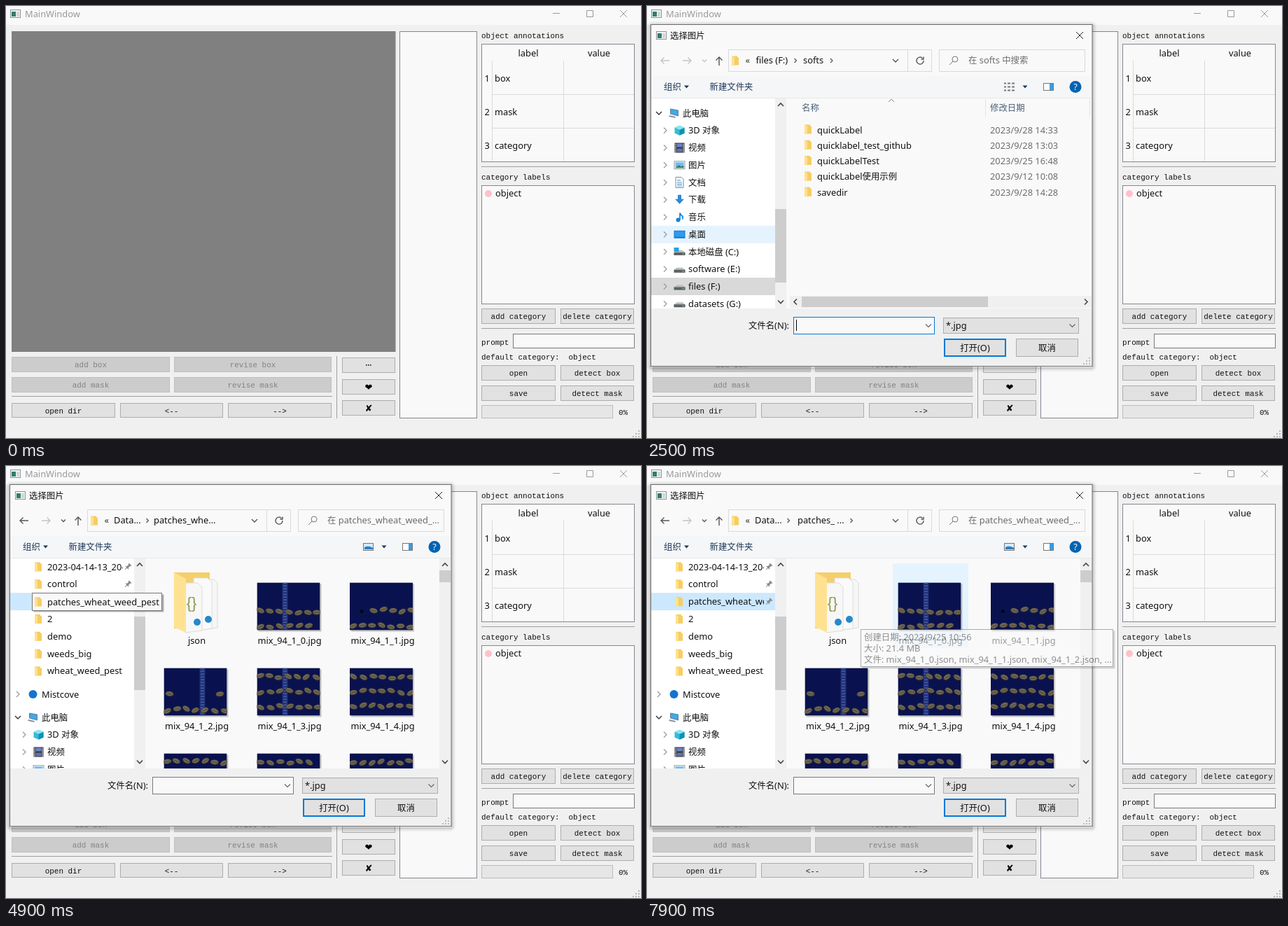
Recreate the animation shown at these times as an HTML page. Size 907 by 617 pixels, loop 8000 ms.

```html
<!DOCTYPE html>
<html lang="zh-CN">
<head>
<meta charset="utf-8">
<title>MainWindow</title>
<style>
html, body { margin: 0; width: 100%; height: 100%; overflow: hidden; background: #f0f0f0; }
svg { display: block; }
text { font: 12.85px "Noto Sans", "Noto Sans CJK SC", "Noto Sans CJK", sans-serif; white-space: pre; }
.cjk { font-size: 12.4px; font-family: "Noto Sans CJK SC", "Noto Sans CJK", sans-serif; }
.mono { font: 10.95px "Liberation Mono", monospace; }
.sym { font: 13px "DejaVu Sans", sans-serif; }
</style>
</head>
<body>
<svg id="stage" width="100%" height="100%" viewBox="0 0 907 617"></svg>
<script>
const WHITE = '#f9f9f9', BLUE = '#0078d7', FRAME = '#828790', INK = '#111', BLUEISH = '#1e395b';

let seed = 7;
const rnd = () => (seed = seed * 16807 % 2147483647) / 2147483647;

const rect = (x, y, w, h, fill, stroke, extra = '') =>
  `<rect x="${x}" y="${y}" width="${w}" height="${h}" fill="${fill}"${stroke ? ` stroke="${stroke}"` : ''} ${extra}/>`;
const path = (d, stroke, fill = 'none', w = 1) =>
  `<path d="${d}" fill="${fill}" stroke="${stroke}" stroke-width="${w}"/>`;
const dot = (x, y, r, fill) => `<circle cx="${x}" cy="${y}" r="${r}" fill="${fill}"/>`;
const group = (id, body, extra = '') => `<g id="${id}" ${extra}>${body}</g>`;

// y is the middle of the line; Chinese runs are set slightly smaller
const runs = s => s.replace(/[\u4e00-\u9fff]+/g, m => `<tspan class="cjk">${m}</tspan>`);
const text = (x, y, s, fill = INK, extra = '') =>
  `<text x="${x}" y="${y + 4.5}" fill="${fill}" ${extra}>${runs(s)}</text>`;
const MID = 'text-anchor="middle"';
const mono = (x, y, s, fill = INK, extra = '') =>
  `<text class="mono" x="${x}" y="${y + 3.5}" fill="${fill}" ${extra}>${s.replace(/</g, '&lt;')}</text>`;

const chevron = (x, y, turn = 0, size = 4, stroke = '#555', w = 1.2) =>
  `<path transform="translate(${x} ${y}) rotate(${turn})" d="M${-size} ${-size / 2}L0 ${size / 2}L${size} ${-size / 2}" fill="none" stroke="${stroke}" stroke-width="${w}"/>`;
const caretDown = (x, y) => path(`M${x - 3.5} ${y - 1.5}h7l-3.5 4z`, 'none', BLUEISH);
const cross = (x, y, r, stroke) => path(`M${x - r} ${y - r}l${2 * r} ${2 * r}M${x + r} ${y - r}l${-2 * r} ${2 * r}`, stroke);
const appIcon = (x, y) => rect(x + .5, y + .5, 14, 11, '#f4f6f6', '#8b9296') + rect(x + 2, y + 3, 6, 7, '#2f7d6b') + rect(x + 9, y + 3, 4, 7, '#cfd6d8');
const folder = (x, y) => path(`M${x - 5} ${y - 6.5}h8v2h2v11h-10z`, 'none', '#f5cd62') + path(`M${x - 5} ${y - 6.5}l4 2v12l-4 -2z`, 'none', '#ffe08c');
const grip = (x, y, c) => [[0, 0], [-4, 0], [-8, 0], [0, -4], [-4, -4], [0, -8]].map(p => rect(x + p[0], y + p[1], 2, 2, c)).join('');
const rule = (x1, y1, x2, y2, c = '#a0a0a0') => path(`M${x1} ${y1}L${x2} ${y2}`, c);

const button = (x, y, w, h, label, id) =>
  `<g${id ? ` id="${id}"` : ''}>` + rect(x + .5, y + .5, w - 1, h - 1, '#e1e1e1', '#adadad') + mono(x + w / 2, y + h / 2 + .5, label, INK, MID) + '</g>';
const disabled = (x, y, w, h, label) =>
  rect(x + .5, y + .5, w - 1, h - 1, '#ccc', '#bfbfbf') + mono(x + w / 2, y + h / 2 + .5, label, '#838383', MID);

function mainWindow() {
  let s = rect(0, 0, 907, 617, '#f0f0f0') + rect(0, 0, 907, 27, WHITE) + appIcon(6, 5);
  s += group('caption', text(27, 11, 'MainWindow', 'currentColor') + path('M781 10.5h10M829.5 6.5h9v9h-9z', 'currentColor') + cross(882, 11, 5, 'currentColor'));
  s += rect(8, 36, 548.5, 458, '#808080') + rect(562.5, 36.5, 110, 552, WHITE, FRAME);

  s += mono(679, 42.5, 'object annotations') + rect(679.5, 54.5, 218, 168, WHITE, FRAME);
  s += text(746, 67, 'label', INK, MID) + text(847, 67, 'value', INK, MID);
  s += path('M694.5 78V222M796.5 78V222M695 126.5H897M695 174.5H897', '#dadada');
  ['box', 'mask', 'category'].forEach((w, i) => {
    s += text(683.5, 103 + 48 * i, `${i + 1}`) + text(698, 103 + 48 * i, w);
  });
  s += rule(679, 229.5, 898, 229.5) + mono(679, 244.5, 'category labels');
  s += rect(679.5, 256.5, 218, 169, WHITE, FRAME) + dot(689, 268, 5, '#ffc0cb') + text(699, 267.5, 'object');
  s += button(679, 432, 106, 22, 'add category') + button(792, 432, 105, 22, 'delete category');
  s += rule(679, 460.5, 898, 460.5) + mono(679, 480, 'prompt') + rect(724.5, 468.5, 173, 20, WHITE, '#7a7a7a');
  s += mono(679, 501, 'default category:') + mono(803.5, 501, 'object');
  s += button(679, 513, 106, 22, 'open') + button(792, 513, 105, 22, 'detect box');
  s += button(679, 542, 106, 22, 'save') + button(792, 542, 105, 22, 'detect mask');
  s += rect(679.5, 570.5, 187, 18, '#e6e6e6', '#bcbcbc') + mono(875, 580, '0%') + grip(903, 614, '#b4b4b4');

  s += disabled(8, 501, 226, 22, 'add box') + disabled(240, 501, 225, 22, 'revise box');
  s += disabled(8, 530, 226, 22, 'add mask') + disabled(240, 530, 225, 22, 'revise mask');
  s += rule(8, 557.5, 466, 557.5) + rule(472.5, 500, 472.5, 589);
  s += button(8, 567, 148, 21, 'open dir', 'openDir') + button(163, 567, 147, 21, '<--') + button(317, 567, 148, 21, '-->');
  s += [502, 533, 563].map(y => button(480, y, 76, 22, '')).join('');
  s += [514, 517, 520].map(x => rect(x, 512, 1.6, 1.6, INK)).join('');
  return s + `<text class="sym" x="518" y="549" ${MID}>❤&#xfe0e;</text><text class="sym" x="518" y="579" ${MID}>✘</text>`;
}

// Tree icons, about 16 px wide, centred on (0, 0)
const disk = path('M-8 1l4 -3h8l4 3v4h-16z', 'none', '#b9bdc0') + rect(-8, 1, 16, 4, '#5c6165') + rect(4, 2.5, 2, 1, '#8fe08f');
const icons = {
  pc: path('M-5 -6l11 2v8l-11 -3z', '#5f7f95', '#43a8e8') + path('M-7 4l9 2', '#8494a0', 'none', 2),
  cube: path('M-7 -4l7 -3l7 3v8l-7 3l-7 -3z', 'none', '#35bcd6') + path('M0 -1l7 -3v8l-7 3z', 'none', '#1490b0') + path('M-7 -4l7 -3l7 3l-7 3z', 'none', '#8ce4f0'),
  video: rect(-7, -7, 14, 14, '#333') + rect(-4, -6, 8, 5, '#6b83c9') + rect(-4, 1, 8, 5, '#5a74b8') + path('M-5.5 -6v13M5.5 -6v13', '#ddd') + path('M-6 -3h1M-6 2h1', '#333'),
  image: rect(-7.5, -5.5, 15, 11, '#fff', '#8c979e') + rect(-6, -4, 12, 8, '#6fbcf0') + path('M-6 4l5 -4l3 2l4 -1v3z', 'none', '#3d7c5c'),
  doc: path('M-5.5 -7.5h8l3 3v12h-11z', '#7d8a94', '#fff') + path('M-3.5 -3h5M-3.5 0h7M-3.5 2.5h7M-3.5 5h7', '#3c8fd0'),
  down: path('M-2.5 -7h5v6h4l-6.5 7l-6.5 -7h4z', 'none', '#3287d6'),
  music: dot(-2, 4, 3, '#0f84d8') + path('M.5 4v-10q1 3 4 5v4', '#0f84d8', 'none', 1.7),
  desk: rect(-8, -5.5, 16, 11, '#1277c9') + rect(-7, -4.5, 14, 8, '#2d9bee'),
  disk, sysdisk: disk + rect(-8, -6, 7, 6, '#1fa5e8'),
  sky: dot(0, 0, 6, '#1373cf')
};
const STEP = 24.75;
const tree = [
  ...['2023-04-14-13_20-08', 'control', 'patches_wheat_weed_pest', '2', 'demo', 'weeds_big', 'wheat_weed_pest']
    .map((name, i) => ({ name, y: -62 + i * 24.83, pin: i < 3 })),
  { name: 'Mistcove', y: 120, icon: 'sky', top: true },
  ...['此电脑:pc', '3D 对象:cube', '视频:video', '图片:image', '文档:doc', '下载:down', '音乐:music', '桌面:desk',
    '本地磁盘 (C:):sysdisk', 'software (E:):disk', 'files (F:):disk', 'datasets (G:):disk'].map((s, i) => {
    const cut = s.lastIndexOf(':');
    return { name: s.slice(0, cut), icon: s.slice(cut + 1), y: 153 + i * STEP, top: i === 0 };
  })
];
const patchRow = tree[2], filesRow = tree[18];

function treeRows() {
  let rows = '', arrows = '';
  for (const r of tree) {
    const x = r.top ? 51 : 59;
    rows += text(x, r.y, r.name, INK, r.pin ? 'clip-path="url(#cut)"' : '');
    if (!r.icon) rows += folder(46, r.y);
    else {
      rows += `<g transform="translate(${x - 12.5} ${r.y})">${icons[r.icon]}</g>`;
      arrows += r.icon === 'pc' ? chevron(17, r.y, 0, 4, '#333', 1.4) : chevron(r.top ? 17 : 26, r.y, -90, 4, '#999');
    }
    if (r.pin) rows += `<g transform="translate(174 ${r.y}) rotate(45)">${path('M-2.5 -5h5v1.5l-1 .5v3l2 2h-7l2 -2v-3l-1 -.5zM-.5 1h1v4.5h-1z', 'none', '#858c92')}</g>`;
  }
  return rect(6, filesRow.y - 12.5, 177, 25, '#d9d9d9') + rect(6, -13, 177, 25, '#e5f3ff', '', 'id="hover"') + rows + group('arrows', arrows);
}

function shade() {
  let s = '';
  for (let i = 1; i < 8; i++)
    s += rect(6.5 - i, 28.5 - i, 629 + 2 * i, 487 + 2 * i, 'none', '#000', `rx="${i}" stroke-opacity="${.26 * (1 - i / 8) ** 1.6}"`);
  return s;
}

const listRows = [['quickLabel', '28 14:33'], ['quicklabel_test_github', '28 13:03'], ['quickLabelTest', '25 16:48'],
  ['quickLabel使用示例', '12 10:08'], ['savedir', '28 14:28']];

function listView() {
  let s = text(221, 145.5, '名称', '#4c607a') + text(490, 145.5, '修改日期', '#4c607a') + chevron(349, 135, 180, 4, '#888', 1);
  s += path('M483.5 133V158M632.5 133V158', '#e4e4e4');
  listRows.forEach(([name, day], i) => {
    const y = 177 + i * 22.3;
    s += folder(230, y - 1) + text(243, y, name) + text(490, y, '2023/9/' + day, '#6d6d6d');
  });
  s += rect(204, 414, 431, 17, '#f0f0f0') + rect(221, 415, 266, 15, '#cdcdcd');
  return s + chevron(212, 422.5, 90, 4, '#444', 1.6) + chevron(627, 422.5, -90, 4, '#444', 1.6);
}

const grain = (x, y, turn) =>
  `<g transform="translate(${x.toFixed(1)} ${y.toFixed(1)}) rotate(${turn.toFixed(0)})">` +
  '<ellipse rx="6.2" ry="3.9" fill="#2e2d30"/><ellipse rx="5.4" ry="3.1" cy="-.3" fill="#6f6653"/><path d="M-4 0h8" stroke="#4a4335" stroke-width=".9"/></g>';

// rows: [y, from, to] lines of grains inside the thumbnail
function thumb(x, y, rows, strip, spot) {
  let s = rect(0, 0, 90, 68, '#080f4a') + rect(0, 0, 90, 68, 'url(#weave)');
  if (strip) s += rect(strip - 4, 0, 8, 68, '#2c4190', '', 'opacity=".7"') +
    `<path d="M${strip} 0V68" stroke="#7184bd" stroke-width="5" stroke-dasharray="1.5 2.5" opacity=".5"/>`;
  if (spot) s += dot(spot[0], spot[1], 2.5, '#05060f');
  for (const [ry, from, to] of rows)
    for (let gx = from; gx <= to; gx += 12.5 + rnd() * 2) s += grain(gx, ry + rnd() * 4 - 2, rnd() * 70 - 35);
  return rect(x + 2, y + 2, 90, 68, '#b9b9b9', '', 'opacity=".8"') + `<svg x="${x}" y="${y}" width="90" height="68">${s}</svg>`;
}

function jsonFolder() {
  let s = path('M240 152h51v80h-51z', 'none', '#f4cf6c');
  s += path('M280 162h17l5 5v64l-22 3z', '#dcdcdc', '#f6f6f6') + path('M268 160h20l6 6v66l-26 4z', '#dcdcdc', '#fafafa');
  s += path('M256 167h18l6 6v62l-24 3z', '#dcdcdc', '#f7f7f7');
  s += `<text x="265" y="203" ${MID} fill="#92974a" style="font:22px 'Liberation Sans',sans-serif">{}</text>`;
  s += dot(273, 223, 5, '#2489ca') + dot(289, 219, 5, '#2489ca');
  return s + path('M240 152l17 9v77l-17 -8z', 'none', '#ffe291') + text(272.5, 249, 'json', INK, MID);
}

function iconView() {
  const col = [225.5, 358.5, 491], full = y => [y, 5, 88];
  const three = [full(13), full(34), full(55)];
  let s = rect(219, 139, 108, 121, '#e5f3ff', '', 'id="cell"') + jsonFolder();
  s += thumb(col[1], 166.5, [full(42), full(62)], 40) + thumb(col[2], 166.5, [[40, 34, 88], full(62)], 0, [17, 41]);
  s += thumb(col[0], 288.5, [[38, 8, 9], [38, 80, 81], full(60)], 55);
  s += thumb(col[1], 288.5, three, 40) + thumb(col[2], 288.5, three, 0, [60, 55]);
  s += col.map(x => thumb(x, 410.5, [full(12), full(40)])).join('');
  [[405, 249], [538, 249], [272.5, 371], [405, 371], [538, 371]].forEach(([x, y], i) => {
    s += text(x, y, `mix_94_1_${i}.jpg`, INK, MID);
  });
  s += rect(619, 132, 16, 300, '#f0f0f0') + rect(619, 149, 16, 17, '#cdcdcd');
  return s + chevron(627, 141, 180, 4, '#444', 1.6) + chevron(627, 422.5, 0, 4, '#444', 1.6);
}

const arrow = (x, y, turn, id = '') =>
  `<path ${id} transform="translate(${x} ${y}) rotate(${turn})" d="M6 0H-6M-1.5 -4.5L-6 0L-1.5 4.5" fill="none" stroke="#c4c4c4" stroke-width="1.4"/>`;

function dialogBody() {
  let s = rect(6, 57, 630, 458, WHITE);
  s += arrow(26, 78, 0, 'id="back"') + arrow(57, 78, 180) + group('recent', chevron(82, 78, 0, 3, 'currentColor', 1.3));
  s += path('M103 85V73M98.5 77.5L103 73L107.5 77.5', '#555', 'none', 1.4);
  s += rect(116.5, 62.5, 290, 31, WHITE, '#d9d9d9') + rule(372.5, 63, 372.5, 93, '#d9d9d9') + folder(126, 78);
  s += text(140.5, 77.5, '«', '#333') + chevron(355, 78, 0, 4, '#555', 1.4);
  s += path('M393.5 74.5a5 5 0 1 0 1.5 3.5M395 72.5v3.5h-3.5', '#555', 'none', 1.4);
  s += text(155.5, 77.5, '', INK, 'id="crumb1"') + text(223, 77.5, '', INK, 'id="crumb2"');
  s += group('sep1', chevron(0, 78, -90, 3)) + group('sep2', chevron(0, 78, -90, 3));
  s += rect(417.5, 62.5, 208, 31, WHITE, '#d9d9d9') + '<circle cx="440" cy="76" r="4" fill="none" stroke="#777"/>' + path('M437 79l-5 5', '#777');
  s += text(459, 77.5, '', '#6d6d6d', 'id="search"');

  s += rect(6, 100, 630, 31, '#f5f6f7') + rule(6, 131.5, 636, 131.5, '#e8e8e8');
  s += text(24, 115.5, '组织', BLUEISH) + caretDown(56.5, 115) + text(89.5, 115.5, '新建文件夹', BLUEISH) + caretDown(540, 115);
  s += group('viewRows', [110, 115, 120].map(y => path(`M510 ${y + .5}h3M515 ${y + .5}h4M521 ${y + .5}h4`, '#777', 'none', 2)).join(''));
  s += group('viewPic', rect(510.5, 110.5, 14, 10, '#d8eafb', '#777') + path('M512 119v-3q6 -3 12 1v2z', 'none', '#2d7cc4'));
  s += rect(566.5, 110.5, 14, 10, '#fff', '#777') + rect(575, 111, 5, 9, '#3c9be0') + dot(612, 115.5, 8.5, '#0063b1');
  s += `<text x="612" y="120" ${MID} fill="#fff" font-weight="bold">?</text>`;

  s += group('panes', rect(6, 132, 177, 300, '#fff') + `<g clip-path="url(#pane)">${group('tree', treeRows())}</g>` +
    rect(183, 132, 16, 300, '#f0f0f0') + rect(183, 290, 16, 105, '#cdcdcd', '', 'id="thumb"') +
    chevron(191, 141, 180, 4, '#444', 1.6) + chevron(191, 422.5, 0, 4, '#444', 1.6) +
    group('list', listView()) + group('grid', iconView(), 'clip-path="url(#pane)"') +
    group('busy', text(416, 156, '正在处理...', '#6d6d6d', MID)));

  s += rect(6, 432, 630, 82, '#f0f0f0') + text(203, 456.5, '文件名(N):', INK, 'text-anchor="end"');
  s += rect(209.5, 444.5, 201, 24, WHITE, BLUE, 'id="field"') + group('caret', rule(213.5, 448, 213.5, 464, '#000'));
  s += chevron(402, 456.5, 0, 4, '#666') + rect(423.5, 445.5, 193, 22, '#e1e1e1', '#adadad') + text(427, 456.5, '*.jpg') + chevron(607.5, 456.5, 0, 4, '#666');
  s += rect(425, 476, 87, 24, '#e1e1e1', BLUE, 'stroke-width="2"') + text(468.5, 488, '打开(O)', INK, MID);
  s += rect(527.5, 475.5, 88, 25, '#e1e1e1', '#adadad') + text(571.5, 488, '取消', INK, MID);
  return s + grip(631, 510, '#bababa');
}

function tips() {
  const name = rect(39.5, 183.5, 186, 25, '#000', '', 'opacity=".3"') + rect(37.5, 181.5, 185, 25, WHITE, '#767676') + folder(46, 194) + text(59, 194, patchRow.name);
  let info = rect(307.5, 235.5, 361, 54, '#000', '', 'opacity=".25"') + rect(305.5, 233.5, 360, 53, WHITE, '#767676');
  ['创建日期: 2023/9/25 10:56', '大小: 21.4 MB', '文件: mix_94_1_0.json, mix_94_1_1.json, mix_94_1_2.json, ...']
    .forEach((line, i) => { info += text(310, 244 + 16.4 * i, line, '#4a4a4a'); });
  return group('tipName', name) + group('tipInfo', info);
}

const stage = document.getElementById('stage');
stage.innerHTML = `<defs><clipPath id="pane"><rect x="6" y="132" width="630" height="300"/></clipPath>
  <clipPath id="cut"><rect x="59" y="-90" width="108" height="120"/></clipPath>
  <pattern id="weave" width="4" height="4" patternUnits="userSpaceOnUse"><path d="M0 0h1.5v1.5h-1.5zM2 2h1.5v1.5h-1.5z" fill="#0d1859"/></pattern></defs>` +
  mainWindow() + group('dialog', shade() + rect(6, 27, 630, 31, WHITE) + appIcon(13, 36) + text(33, 42, '选择图片') + cross(618, 42, 5, '#222') +
    group('body', dialogBody()) + rect(5.5, 26.5, 630.5, 488, 'none', '#6b6b6b') + tips());

const $ = id => document.getElementById(id);
const show = (id, on) => $(id).style.opacity = +on;
const set = (id, name, v) => $(id).setAttribute(name, v);
const put = (id, x, s) => { set(id, 'x', x); $(id).innerHTML = runs(s); };
const at = (t, first, ...keys) => keys.reduce((v, [k, next]) => t >= k ? next : v, first);

function draw(t) {
  $('caption').style.color = t >= 900 && t < 1100 ? '#000' : '#999';
  const [fill, line] = at(t, ['#e1e1e1', '#adadad'], [700, ['#e5f1fb', BLUE]], [900, ['#cce4f7', '#005499']],
    [1000, ['#e5f1fb', BLUE]], [1700, ['#e1e1e1', '#adadad']]);
  const face = $('openDir').firstChild;
  face.setAttribute('fill', fill);
  face.setAttribute('stroke', line);

  show('dialog', t >= 1400);
  show('body', t >= 1500);
  show('panes', t >= 1600);

  const scroll = at(t, 0, [3400, 69], [3800, 138], [3900, 206]);
  const mouse = at(t, 0, [1900, 425], [2000, 376], [2100, 351], [2200, 326], [3000, 351], [3200, 376],
    [3900, 340], [4000, 293], [4200, 243], [4300, 194]);
  const over = tree.find(r => Math.abs(r.y + scroll - mouse) <= 12.5);
  const opened = t >= 4700;
  set('tree', 'transform', `translate(0 ${scroll})`);
  set('thumb', 'y', 290 - 75 * scroll / 206);
  show('hover', !!over && t >= 1900);
  if (over) set('hover', 'y', over.y - 12.5);
  set('hover', 'fill', opened ? '#cce8ff' : '#e5f3ff');
  show('arrows', Math.min(1, Math.max(0, (t - 1800) / 400)));
  show('caret', !opened && Math.floor(t / 500) % 2);
  set('field', 'stroke', opened ? '#7a7a7a' : BLUE);

  const moved = t >= 4800, settled = t >= 5000;
  set('back', 'stroke', moved ? '#555' : '#c4c4c4');
  $('recent').style.color = moved ? '#555' : '#c4c4c4';
  put('crumb1', moved ? 154 : 155.5, moved ? 'Data...' : 'files (F:)');
  put('crumb2', settled ? 215 : moved ? 211 : 223, settled ? 'patches_ ...' : moved ? 'patches_whe...' : 'softs');
  set('sep1', 'transform', `translate(${moved ? 202 : 212} 0)`);
  set('sep2', 'transform', `translate(${settled ? 292 : 263.5} 0)`);
  show('sep2', !moved || settled);
  put('search', 459, moved ? '在 patches_wheat_weed_...' : '在 softs 中搜索');
  show('viewRows', !moved);
  show('viewPic', moved);
  show('list', !opened);
  show('busy', opened && t < 4900);
  show('grid', t >= 4900);

  show('cell', t >= 6000);
  set('cell', 'x', t >= 6100 && t < 7800 ? 218.5 : 351);
  show('tipName', at(t, 0, [4400, .5], [4500, 1], [5300, .5], [5400, 0]));
  show('tipInfo', at(t, 0, [7200, .5], [7300, 1], [7800, .85], [7900, .6]));
}

let start, last;
function tick(now) {
  start ??= now;
  const t = Math.floor((now - start) % 8000 / 100) * 100;
  if (t !== last) draw(last = t);
  requestAnimationFrame(tick);
}
draw(0);
requestAnimationFrame(tick);
</script>
</body>
</html>
```
